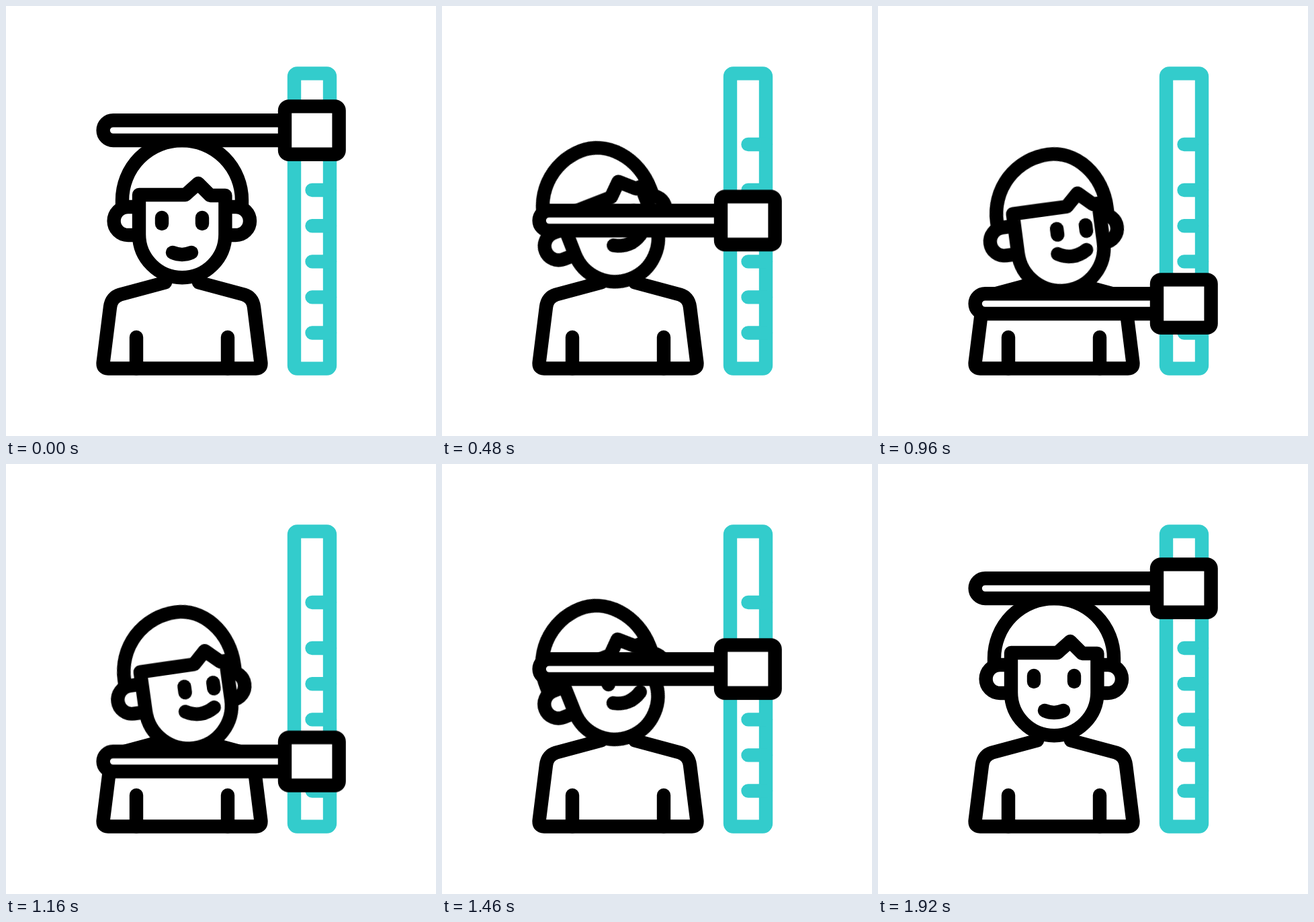
These frames come from a looping animation (640 px wide and 640 px high, 2.4 s). An HTML page without scripts:

```html
<!DOCTYPE html>
<html lang="en">
<head>
<meta charset="utf-8">
<title>Height check</title>
<style>
  html, body { margin: 0; width: 100%; height: 100%; overflow: hidden; background: #fff; }
  svg { display: block; width: 100%; height: 100%; }

  .line { fill: none; stroke: #000; stroke-width: 20.4; stroke-linejoin: round; }
  .round { stroke-linecap: round; }
  .solid { fill: #fff; }
  .teal { stroke: #33cccc; }

  .slider, .head, .turn {
    animation: 2400ms cubic-bezier(.333, 0, .667, 1) infinite;
  }
  .slider { animation-name: slide; }
  .head { animation-name: nod; }
  .turn { d: var(--front); animation-name: turn; }

  @keyframes slide {
    0%, 7.2% { transform: translateY(0); }
    32.2%, 47.8% { transform: translateY(258px); }
    72.8%, 100% { transform: translateY(0); }
  }
  @keyframes nod {
    0%, 80%, 100% { transform: translate(262px, 340px) rotate(0deg); }
    16%, 62.9% { transform: translate(256.2px, 345px) rotate(-22.4deg); }
    40%, 46.7% { transform: translate(271.8px, 359.7px) rotate(-7.5deg); }
  }
  @keyframes turn {
    0%, 80%, 100% { d: var(--front); }
    16%, 62.9% { d: var(--side); }
  }

  .ear-l {
    --front: path("M-64 -41H-80.4A21 21 0 0 0 -80.4 1H-64");
    --side: path("M-64 -41H-82A21 21 0 0 0 -82 1H-64");
  }
  .ear-r {
    --front: path("M64 -41H80A21 21 0 0 1 80 1H64");
    --side: path("M64 -41H66.3A21 21 0 0 1 66.3 1H64");
  }
  .hair {
    --front: path("M-89 -42V-51A89 89 0 0 1 0 -140A89 89 0 0 1 89 -51V-42");
    --side: path("M-89 -42V-51A89 89 0 0 1 0 -140A76 89 0 0 1 76 -51V-42");
  }
  .face {
    --front: path("M-64 -59L5 -59L24 -76L42 -58L64.4 -58V0A64.2 64.2 0 0 1 -64 0Z");
    --side: path("M-64 -59L17 -59.5L35.5 -77L56 -58L64.4 -58V0A64.2 64.2 0 0 1 -64 0Z");
  }
  .eye-l {
    --front: path("M-30 -25V-16");
    --side: path("M-2 -28.5V-19.5");
  }
  .eye-r {
    --front: path("M30 -25V-16");
    --side: path("M41.2 -28.5V-19.5");
  }
  .mouth {
    --front: path("M-14 27Q0 33 14 27");
    --side: path("M-5.6 8.7Q16 21.5 37.7 8.2");
  }
</style>
</head>
<body>
<svg viewBox="0 0 640 640">
  <g class="line teal round">
    <rect x="429" y="100.4" width="53" height="439.2" rx="4.5"/>
    <path d="M482 206H455.5M482 274H455.5M482 327.3H455.5M482 380.4H455.5M482 433.4H455.5M482 486.5H455.5"/>
  </g>

  <g class="line round">
    <path d="M237 411.5L170 429.5Q157 433.5 155 448L144.6 531Q144 539.5 152 539.5H372Q380 539.5 379.4 531L369 448Q367 433.5 354 429.5L287 411.5"/>
    <path d="M194 493V539.5M330 493V539.5"/>
  </g>

  <g class="head">
    <path class="line turn ear-l"/>
    <path class="line turn ear-r"/>
    <path class="line turn hair"/>
    <path class="line solid turn face"/>
    <path class="line round turn eye-l"/>
    <path class="line round turn eye-r"/>
    <path class="line round turn mouth"/>
  </g>

  <g class="slider">
    <path class="line solid" d="M415 170.2H159.5A14.9 14.9 0 0 0 159.5 200H415"/>
    <rect class="line solid" x="415" y="149.4" width="80.6" height="71.4" rx="6"/>
  </g>
</svg>
</body>
</html>
```
